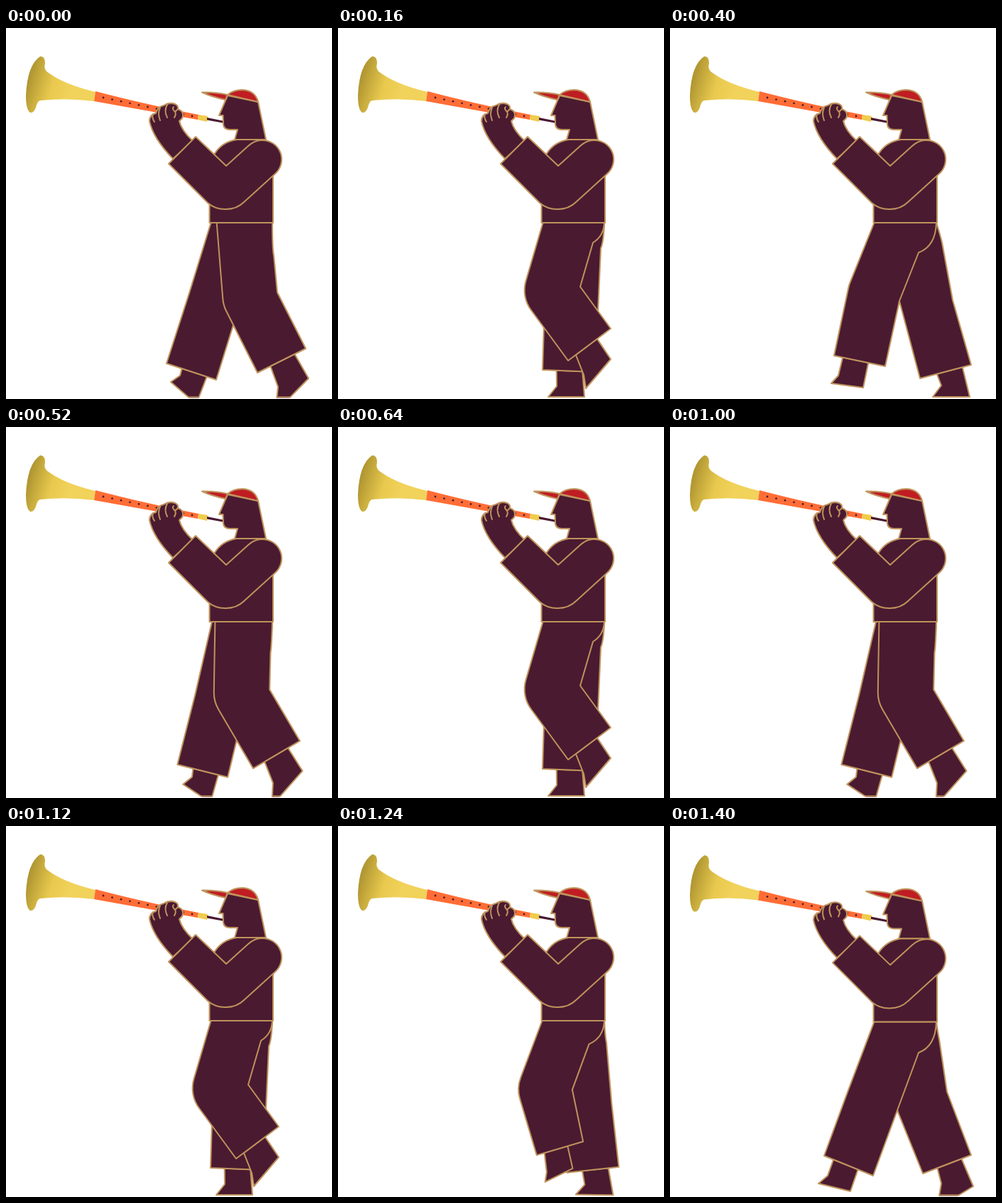
An HTML page with a canvas for the animation above (1440 ms loop, 459 by 522 pixels).

```html
<!DOCTYPE html>
<html lang="en">
<head>
<meta charset="utf-8">
<title>Marching horn player</title>
<style>
  html, body { margin: 0; width: 100%; height: 100%; overflow: hidden; background: #fff; }
  canvas { display: block; }
</style>
</head>
<body>
<canvas id="stage" width="459" height="522"></canvas>
<script>
const ctx = document.getElementById('stage').getContext('2d');
const PLUM = '#4a1a31', TAN = '#bf935c', RED = '#c01d23', ORANGE = '#ff6d36', YELLOW = '#f0cb4c';
const FRAME = 40, STEP = 480, CYCLE = 960, GROUND = 520;

// One leg over two steps: swing forward, then stance. Each pose holds
// front knee, front cuff, back cuff, back knee, seat, instep, toe, heel, ankle offset.
const times = [0, 160, 400, 440, 480, 640, 880, 920];
const poses = [
  [306,390, 354,485, 422,451, 382,372, 377,320, 383,505, 379,541, 426,493, .27],
  [258,378, 324,468, 384,423, 341,364, 359,302, 346,488, 349,507, 384,466, .18],
  [252,362, 231,461, 303,476, 323,384, 350,316, 237,489, 227,500, 272,506, .17],
  [252,369, 217,464, 286,492, 320,400, 350,319, 222,492, 209,503, 254,514, .19],
  [258,373, 226,472, 296,495, 320,418, 350,330, 245,489, 232,498, 268,529, .31],
  [291,385, 288,481, 361,484, 366,398, 370,310, 308,504, 296,519, 347,519, .27],
  [323,384, 352,493, 424,474, 398,383, 383,302, 382,503, 370,519, 422,519, .33],
  [320,400, 356,489, 424,463, 390,374, 379,300, 382,503, 376,538, 427,507, .3]
];

const at = (i) => {
  const n = times.length, k = (i + n) % n;
  return { time: times[k] + CYCLE * Math.floor(i / n), pose: poses[k] };
};

// Cyclic cubic through the poses
function poseAt(t) {
  t %= CYCLE;
  const i = times.findLastIndex(v => v <= t);
  const [p, a, b, q] = [i - 1, i, i + 1, i + 2].map(at);
  const d = b.time - a.time, u = (t - a.time) / d, u2 = u * u, u3 = u2 * u;
  return a.pose.map((v, k) => {
    const w = b.pose[k];
    const m0 = (w - p.pose[k]) / (b.time - p.time) * d;
    const m1 = (q.pose[k] - v) / (q.time - a.time) * d;
    return (2*u3 - 3*u2 + 1) * v + (u3 - 2*u2 + u) * m0 + (3*u2 - 2*u3) * w + (u3 - u2) * m1;
  });
}

function shape(path, fill = PLUM, stroke = TAN) {
  if (fill) { ctx.fillStyle = fill; ctx.fill(path); }
  if (stroke) { ctx.strokeStyle = stroke; ctx.stroke(path); }
}
const draw = (d, fill, stroke) => shape(new Path2D(d), fill, stroke);

function leg(t, bob) {
  const [kx, ky, fx, fy, bx, by, nx, ny, sx, sy, ix, iy, tx, ty, hx, hy, k] = poseAt(t);
  const cuff = (r) => [fx + (bx - fx) * r, fy + (by - fy) * r];

  const foot = new Path2D();
  for (const p of [cuff(k), [ix, iy], [tx, ty], [hx, hy], cuff(k + .5)]) foot.lineTo(...p);
  foot.closePath();
  ctx.save();
  ctx.beginPath();
  ctx.rect(0, 0, 459, GROUND + .5);
  ctx.clip();
  shape(foot);
  ctx.clip(foot);
  ctx.fillStyle = TAN;
  ctx.fillRect(0, GROUND - 1.5, 459, 2);
  ctx.restore();

  const trouser = new Path2D();
  trouser.moveTo(288 + (kx - 255) * .17, 274 + bob);
  trouser.arcTo(kx, ky, fx, fy, 47);
  trouser.lineTo(fx, fy);
  trouser.lineTo(bx, by);
  trouser.lineTo(nx, ny);
  trouser.lineTo(sx, sy);
  trouser.quadraticCurveTo(Math.max(374, sx - 2), sy - 9, 375, 274 + bob);
  trouser.closePath();
  shape(trouser);
}

const brass = ctx.createLinearGradient(28, 70, 90, 88);
brass.addColorStop(0, '#a98f2f');
brass.addColorStop(.3, '#c9ad3e');
brass.addColorStop(.6, '#e9c94e');
brass.addColorStop(1, '#f1d25a');

function horn() {
  draw('M48 40Q55 39 55 50Q53 56 57 61Q80 79 126 90L124 103Q85 98 48 102Q44 103 42 112Q39 120 34 119Q28 115 28 95Q30 52 48 40Z', brass, null);
  draw('M126 89Q190 106 271 122L270 129Q190 115 124 103Z', ORANGE, null);
  draw('M271 122L284 124L283 132L270 129Z', YELLOW, null);
  draw('M283 126L305 130.5V133.5L283 129.5Z', PLUM, null);
  for (let i = 0; i <= 10; i++) {
    const dot = new Path2D();
    dot.arc(137 + 12.5 * i, 98 + 2.6 * i, 1.4, 0, 7);
    shape(dot, PLUM, null);
  }
}

function upperBody() {
  draw('M312 95L300 123H305.500L306 136Q307 143 315 143H326L322 157H366L355 104Z');
  draw('M276 90.500Q296 90 312 94L309 101Q290 97 276 90.500Z', RED);
  draw('M312 94Q320 87 333 87Q351 88 355 104Z', RED);
  draw('M286.500 274V245L293 178Q304 160 325 157H357L376 205V274Z');
  horn();
  draw('M235 184Q207 155 202 131Q202 122 211 120Q213 111 222 109Q230 104 238 107Q243 109 242 114Q252 118 248 127L244 131Q247 144 263 159Z');
  draw('M209 132Q205 126 207 121M217 130Q213 120 217 112M227 126Q222 116 227 108M237 126Q240 121 238 118Q233 113 236 111M238 118L242 114', null);
  draw('M267 153L310 194L341 166Q350 158 359 158A27 27 0 0 1 378 206L335 245Q325 255 309 255Q294 255 284 246L229 191Z');
}

function render() {
  const now = Math.floor(performance.now() / FRAME) * FRAME % STEP;
  const bob = now === STEP - FRAME ? 1.4 : 0;
  ctx.fillStyle = '#fff';
  ctx.fillRect(0, 0, 459, 522);
  ctx.lineWidth = 2;
  ctx.lineJoin = ctx.lineCap = 'round';
  leg(now + STEP, bob);
  leg(now, bob);
  ctx.save();
  ctx.translate(0, bob);
  upperBody();
  ctx.restore();
  requestAnimationFrame(render);
}
render();
</script>
</body>
</html>
```
